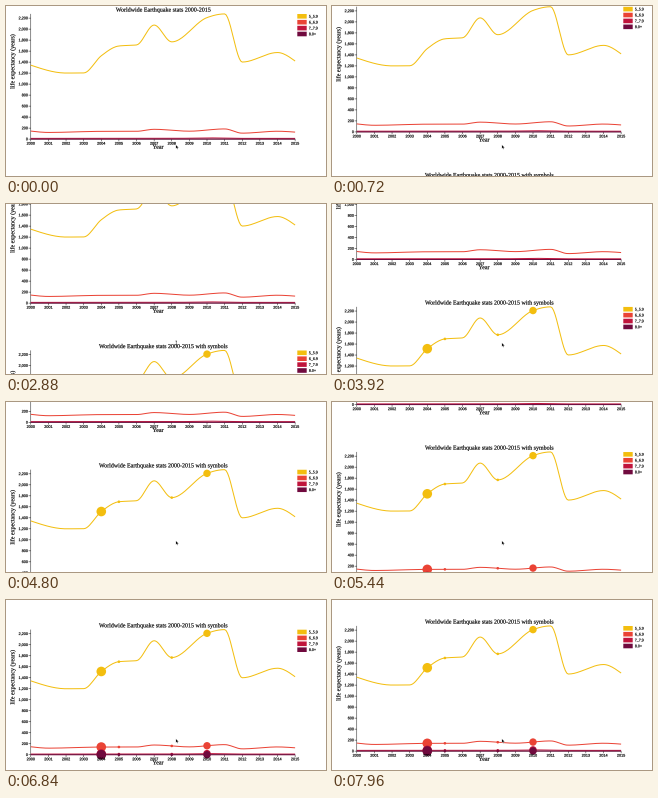
A matplotlib script that plays this animation: 320x170 px, repeating every 8000 ms.

```python
import matplotlib.pyplot as plt
import numpy as np
from matplotlib.animation import FuncAnimation
from matplotlib.patches import Circle, PathPatch, Polygon, Rectangle
from matplotlib.path import Path
from matplotlib.textpath import TextPath
from matplotlib.transforms import Affine2D

W, H, DPI = 320, 170, 100
STEP, FRAMES = 40, 200
PT = 72 / DPI

LEFT, YEAR_W, UNIT = 24.8, 17.62, 0.055
BASE, PITCH = 133.1, 172.5
PLOT_H = 125.2
SERIF, SANS = "Liberation Serif", "Liberation Sans"


def monotone(keys, x):
    """Monotone cubic through the {x: y} key points, evaluated at x."""
    kx, ky = np.array(list(keys)), np.array(list(keys.values()), float)
    h = np.diff(kx)
    s = np.diff(ky) / h
    a, b = s[:-1], s[1:]
    mean = abs(a * h[1:] + b * h[:-1]) / (h[1:] + h[:-1])
    m = np.zeros(len(kx))
    m[1:-1] = (np.sign(a) + np.sign(b)) * np.minimum(
        np.minimum(abs(a), abs(b)), mean / 2)
    m[0] = (3 * s[0] - m[1]) / 2
    m[-1] = (3 * s[-1] - m[-2]) / 2
    i = np.clip(np.searchsorted(kx, x, side="right") - 1, 0, len(h) - 1)
    u = (x - kx[i]) / h[i]
    return (ky[i] + (ky[i + 1] - ky[i]) * u * u * (3 - 2 * u)
            + h[i] * u * (1 - u) * (m[i] * (1 - u) - m[i + 1] * u))


# quake counts by year since 2000
def magnitude5(x):
    return monotone({0: 1344, 2: 1201, 3: 1203, 4: 1515, 5: 1693, 6: 1712,
                     7: 2074, 8: 1768, 10: 2209, 11: 2276, 12: 1401,
                     14: 1574, 15: 1419}, x)


def magnitude6(x):
    return monotone({0: 146, 1: 121, 4: 141, 6: 142, 7: 178, 9: 144,
                     11: 185, 12: 108, 14: 143, 15: 127}, x)


def magnitude7(x):
    return 13 + 9 * np.exp(-(x - 10) ** 2)


def magnitude8(x):
    return 1 + 0 * x


SERIES = [("5_5.9", "#f3be0f", magnitude5), ("6_6.9", "#ea4335", magnitude6),
          ("7_7.9", "#c0143c", magnitude7), ("8.0+", "#700a3e", magnitude8)]
SYMBOLS = {4: 4.8, 5: 1.3, 8: 1.3, 10: 3.7}  # year: radius

# page offset in px at key times in ms; equal neighbours are pauses
SCROLL = {0: 0, 1280: 9.5, 1400: 9.5, 2880: 34, 3440: 34, 4320: 110.7,
          4560: 110.7, 6240: 147.6, 6560: 147.6, 6840: 150.8, 7680: 150.8,
          7960: 154.5}

fig = plt.figure(figsize=(W / DPI, H / DPI), dpi=DPI, facecolor="white")
ax = fig.add_axes([0, 0, 1, 1])
ax.set_xlim(0, W)
ax.set_ylim(H, 0)
ax.axis("off")


def text(x, y, s, size, family=SERIF, anchor=0.5, turn=0):
    """Place text with its baseline on (x, y); anchor 0 left, 1 right."""
    path = TextPath((0, 0), s, size=size, prop={"family": family})
    box = path.get_extents()
    shift = box.x0 + anchor * box.width
    place = (Affine2D().translate(-shift, 0).scale(1, -1)
             .rotate_deg(turn).translate(x, y))
    ax.add_patch(PathPatch(place.transform_path(path), fc="black",
                           ec="black", lw=0.15 * PT, snap=False, zorder=3))


def stroke(points, color, width, z):
    ax.add_patch(PathPatch(Path(points), fc="none", ec=color, lw=width * PT,
                           capstyle="butt", snap=False, zorder=z))


def segment(x0, y0, x1, y1):
    stroke([(x0, y0), (x1, y1)], "black", 0.45, 1)


def year_x(year):
    return LEFT + YEAR_W * year


def axes_lines(base):
    segment(LEFT, base - PLOT_H, LEFT, base)
    segment(LEFT, base, year_x(15), base)
    for value in range(0, 2201, 200):
        y = base - value * UNIT
        segment(LEFT - 2.2, y, LEFT, y)
        text(21.8, y + 1.2, f"{value:,}", 3.75, SANS, 1)
    for year in range(16):
        x = year_x(year)
        segment(x, base, x, base + 2.2)
        text(x, base + 5.5, str(2000 + year), 3.75, SANS)


def chart(base, title, symbols):
    axes_lines(base)
    text(157.2, base - 127.5, title, 6)
    text(152, base + 9.6, "Year", 6)
    text(8.3, base - 77.5, "life expectancy (years)", 6, turn=-90)
    years = np.linspace(0, 15, 181)
    for k, (name, color, count) in enumerate(SERIES):
        curve = np.column_stack([year_x(years), base - UNIT * count(years)])
        stroke(curve, color, 1.0, 2)
        if symbols:
            for year, r in SYMBOLS.items():
                spot = year_x(year), base - UNIT * count(year)
                ax.add_patch(Circle(spot, r, fc=color, lw=0, zorder=2.5))
        y = base - 122.8 + 5.9 * k
        ax.add_patch(Rectangle((291.3, y - 2.3), 9.4, 4.6, fc=color, lw=0,
                               snap=False))
        text(303, y + 1.3, name, 4, anchor=0)


TITLE = "Worldwide Earthquake stats 2000-2015"
chart(BASE, TITLE, False)
chart(BASE + PITCH, TITLE + " with symbols", True)

# the pointer stays on the screen while the page scrolls
screen = Affine2D().translate(0, -H).scale(1 / W, -1 / H) + ax.transAxes
arrow = Polygon([(169.9, 138.8), (169.9, 142.7), (170.8, 141.9),
                 (171.5, 143.3), (172.1, 143.0), (171.5, 141.7),
                 (172.7, 141.6)],
                fc="black", ec="white", lw=0.2, transform=screen, zorder=5)
beam = PathPatch(Path([(169.4, 137), (171, 137), (170.2, 137), (170.2, 141),
                       (169.4, 141), (171, 141)],
                      [Path.MOVETO, Path.LINETO] * 3),
                 fc="none", ec="#333333", lw=0.5 * PT, snap=False,
                 transform=screen, zorder=5)
ax.add_patch(arrow)
ax.add_patch(beam)


def draw(i):
    top = monotone(SCROLL, i * STEP)
    ax.set_ylim(H + top, top)
    over_title = abs(BASE + PITCH - 130 - top - 140) < 3.5
    arrow.set_visible(not over_title)
    beam.set_visible(over_title)
    return []


anim = FuncAnimation(fig, draw, frames=FRAMES, interval=STEP, repeat=True,
                     repeat_delay=0, blit=False)
plt.show()
```
